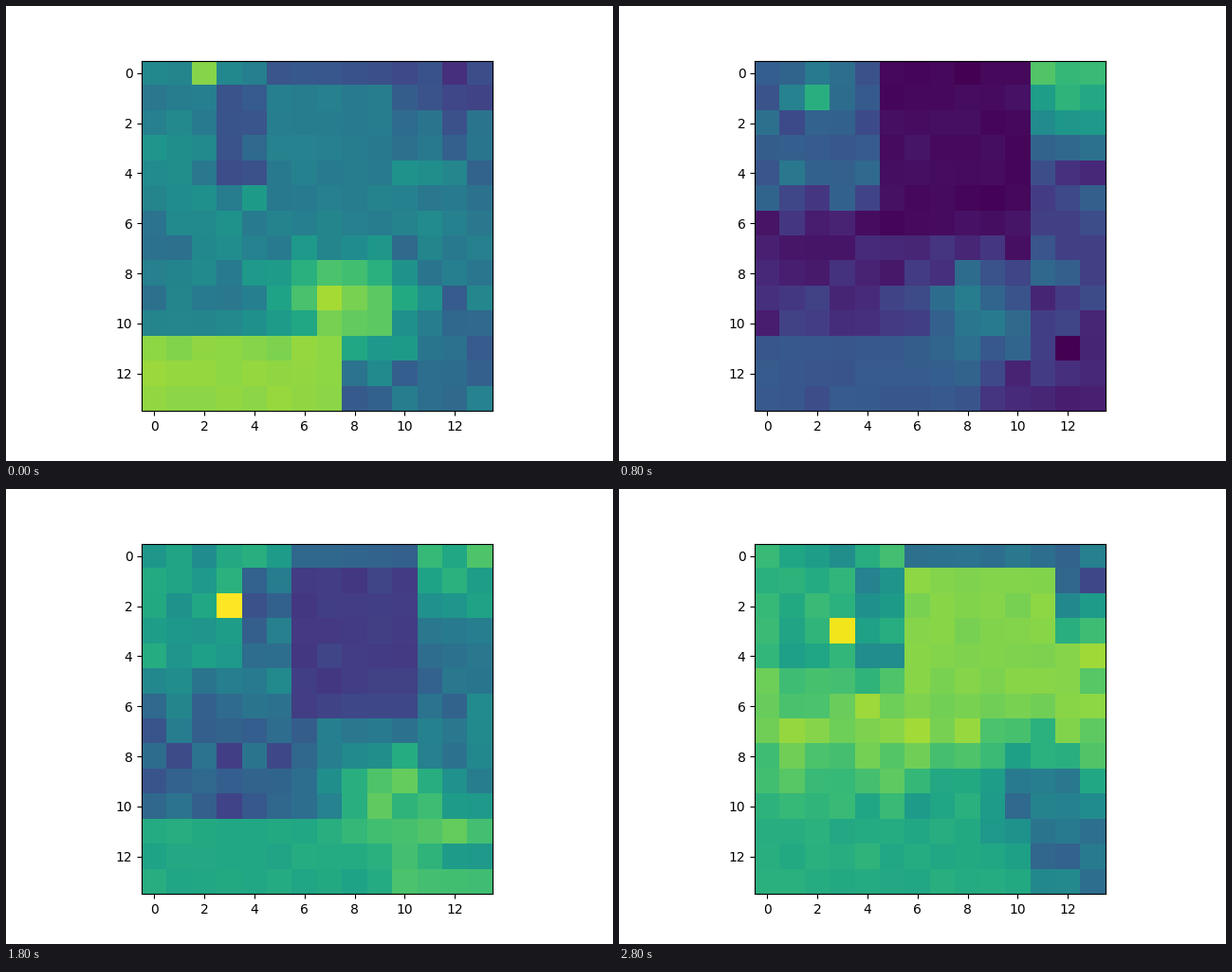
These frames come from a looping animation (640x480 px, 3000 ms). A matplotlib script:

```python
import numpy as np
import matplotlib.pyplot as plt
from matplotlib.animation import FuncAnimation

SIZE = 14
COUNT = 15
STEP_MS = 200
KEYS = [0, 2, 4, 6, 9, 12, 14]

rows, cols = np.mgrid[:SIZE, :SIZE]


def track(step, *levels):
    """Level at a step, eased linearly between the key times."""
    return np.interp(step, KEYS, levels)


def background(step, split):
    """Vertical gradients left and right of the split column."""
    left = np.interp(rows, [4, 6.5, 10], [
        track(step, 46, 42, 33, 40, 57, 63, 64),
        track(step, 44, 14, 5, 83, 31, 72, 82),
        track(step, 44, 38, 13, 72, 30, 38, 64),
    ])
    middle = track(step, 43, 32, 18, 62, 37, 80, 84)
    right = np.interp(rows, [1, 4, 8, 12], [
        track(step, 25, 72, 65, 6, 60, 30, 30),
        middle, middle,
        track(step, 30, 20, 10, 40, 62, 35, 37),
    ])
    return np.where(cols < split, left, right)


def grid_at(step):
    # the view pans slowly, so every edge drifts to the right
    wall_left = int(5 + 0.13 * step)
    wall_right = int(10.8 + 0.1 * step)
    floor_right = int(8.3 + 0.25 * step)
    grid = background(step, wall_right)
    calm = np.zeros((SIZE, SIZE), bool)

    wall = np.s_[:7, wall_left:wall_right]
    grid[wall] = track(step, 42, 17, 3, 83, 18, 82, 81)
    grid[0, wall_left:wall_right] = track(step, 26, 31, 2, 92, 33, 90, 37)
    grid[1:5, wall_left - 2:wall_left] = track(step, 27, 15, 30, 36, 34, 40, 55)

    floor = np.s_[11:, :floor_right]
    grid[floor] = track(step, 83, 80, 27, 54, 60, 6, 62)
    grid[11:, floor_right:] = track(step, 36, 24, 12, 40, 68, 32, 40)
    calm[wall] = calm[floor] = True

    # soft mound in front of the wall
    centre = 7.5 + 0.23 * step
    mound = np.exp(-((rows - 9.5) / 2) ** 2 - ((cols - centre) / 2.4) ** 2)
    level = track(step, 84, 82, 42, 34, 76, 18, 40)
    grid += mound * (level - grid)

    noise = np.random.default_rng(step).normal(size=grid.shape)
    grid += noise * np.where(calm, 1.2, 5)

    spot = int(0.6 + 0.2 * step), int(2 + 0.12 * step)
    grid[spot] = track(step, 82, 100, 63, 57, 100, 60, 98)
    return np.clip(grid / 100, 0, 1)


fig, ax = plt.subplots(figsize=(6.4, 4.8), dpi=100)
image = ax.imshow(grid_at(0), cmap="viridis", vmin=0, vmax=1)


def update(step):
    image.set_data(grid_at(step))
    return [image]


anim = FuncAnimation(fig, update, frames=COUNT, interval=STEP_MS,
                     repeat=True, repeat_delay=0)
plt.show()
```
